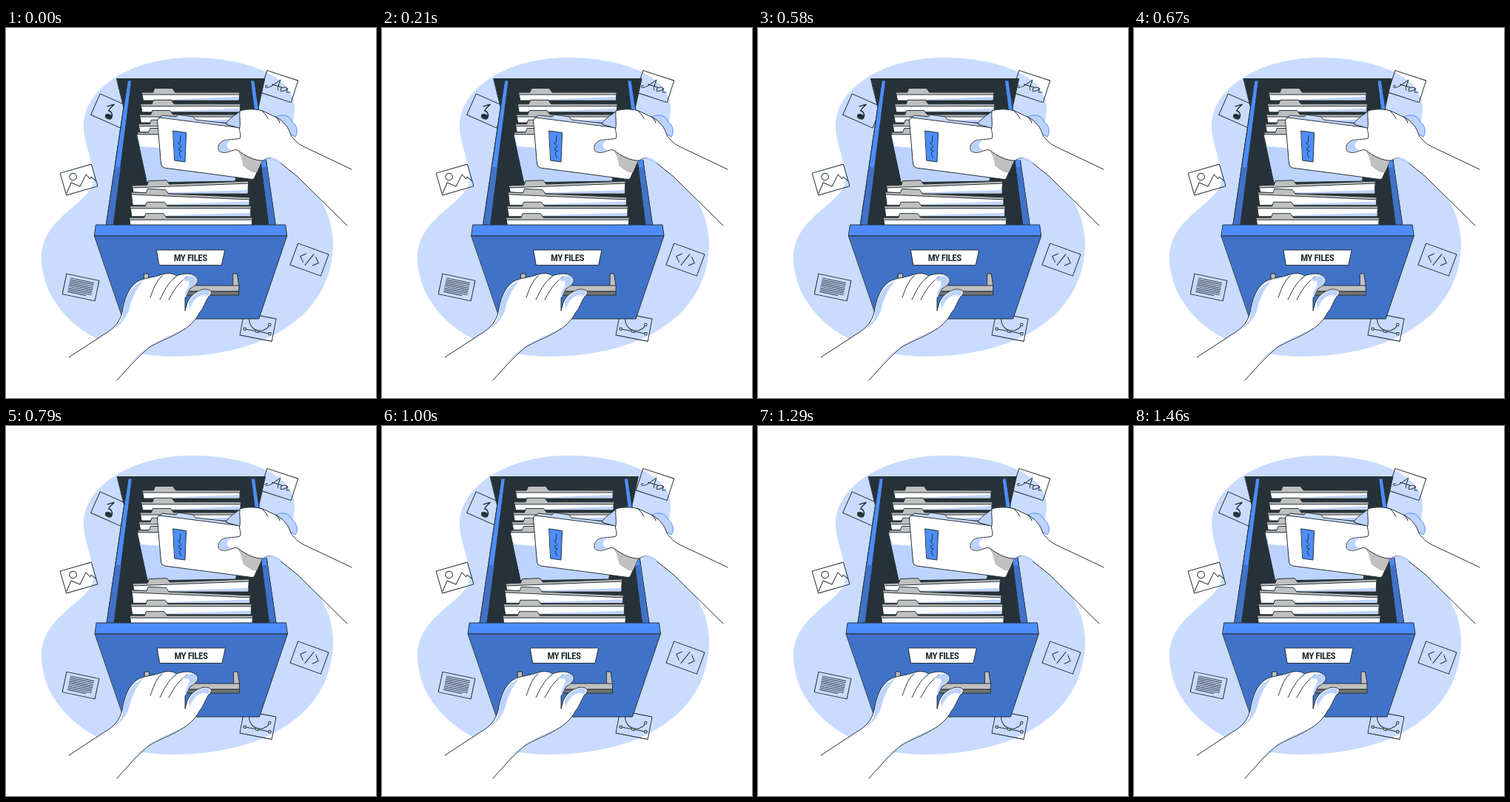
These frames come from a looping animation (500x500 px, 1500 ms). An HTML page:

```html
<!DOCTYPE html>
<html lang="en">
<head>
<meta charset="utf-8">
<title>My files</title>
<style>
  html, body { margin: 0; height: 100%; overflow: hidden; background: #fff; }
  svg { display: block; width: 100vw; height: 100vh; fill: none; stroke: #263238; stroke-linejoin: round; stroke-linecap: round; }
  .pale { fill: #c9dcff; }
  .shade { fill: #bcd3ff; }
  .white { fill: #fff; }
  .bright { fill: #4d8dfb; }
  .deep { fill: #4072c8; }
  .dark { fill: #263238; }
  .grey { fill: #c0c0c0; }
  .under { fill: #757575; }
  .flat { stroke: none; }
  text { font: 700 13px "Roboto Condensed", "Open Sans Condensed", Roboto, sans-serif; font-stretch: condensed; letter-spacing: -.5px; text-anchor: middle; stroke: none; fill: #263238; }
</style>
</head>
<body>
<svg viewBox="0 0 500 500">
  <defs><rect id="card" x="-22" y="-15.500" width="44" height="31"/></defs>

  <path class="pale flat" d="M250 40C172 40 105 80 105 132C105 160 121 185 118 207C114 238 48 255 48 311C48 380 120 444 225 444C345 444 442 392 442 290C442 225 380 190 385 145C387 128 392 115 389 98C380 62 320 40 250 40Z"/>

  <g transform="translate(369 79) rotate(18)">
    <use href="#card"/>
    <path d="M-15 4C-19 4 -18 8 -14 6C-8 3 -4 -6 -1 -9C-1 -4 -2 2 0 5M-10 0H4M11 -1C7 -3 1 2 4 5C8 6 10 2 12 -1C11 3 11 6 16 3"/>
  </g>
  <g transform="translate(141 112) rotate(24)">
    <use href="#card"/>
    <ellipse class="dark" cx="1" cy="8" rx="4.500" ry="3"/>
    <path stroke-width="1.500" d="M-6 -4L1 -10C0 -6 -3 -2 -2 1C2 0 6 4 5 8"/>
  </g>
  <g transform="translate(98.500 205) rotate(-16)">
    <use href="#card"/>
    <circle cx="-6.500" cy="-6" r="4.800"/>
    <path d="M-21 13L-11 1L-1 9L11 -4L15 3L17 1L22 8"/>
  </g>
  <g transform="translate(410 313) rotate(20)">
    <use href="#card"/>
    <path d="M-7 -6L-13 0L-7 6M3 -9L-3 9M7 -6L13 0L7 6"/>
  </g>
  <g transform="translate(101 350.500) rotate(12)">
    <use href="#card" transform="scale(1.02 .9)"/>
    <path id="lines"/>
  </g>
  <g transform="translate(340.500 404) rotate(11)">
    <use href="#card"/>
    <path d="M-14 -9C-10 9 10 9 15 -6M-17 6H18"/>
    <path class="white" d="M-18.500 4.500h3v3h-3zM-1.500 4.500h3v3h-3zM16 4.500h3v3h-3z"/>
    <circle class="white" cx="15" cy="-6" r="1.600"/>
  </g>

  <g id="drawer">
    <path class="dark" d="M150 68.500H350L341 109L336 71H165L159 106Z"/>
    <path class="dark" d="M165 71H336L364.500 266H136Z"/>
    <path class="bright" d="M165 71H170L145 266H136ZM331 71H336L364.500 266H355.500Z"/>
    <path class="deep flat" d="M148 188H155L145 266H136.500ZM346 188H353L364 266H356Z"/>
    <g id="back-files"></g>
    <path class="shade" d="M177 144H322L310 207L191 209Z"/>
    <path class="white flat" d="M178 144.500H320V170L182 160Z"/>
    <g id="front-files"></g>
    <path class="bright" d="M122 266H378L380 281H120Z"/>
    <path class="deep" d="M120 281H380L342 393H158.500Z"/>
    <path class="white" d="M204 300H296L291.500 320.500H207.500Z"/>
    <text x="249.500" y="315">MY FILES</text>
    <path class="grey" d="M187 332H193V348H307V332H312.500L315 348V356H187Z"/>
    <path d="M307 348H315"/>
    <path class="under" d="M187 356H315V361H187Z"/>
  </g>

  <g id="folder">
    <path class="pale" d="M207 122L211 118L230 120L233 117L253 120L256 124L318 131V140Z"/>
    <path class="white" d="M208 121L318 135L349 172L336 202Q335 205 332 204.500L214 189Q210 188 209.500 184L204.500 125Q204.500 121 208 121Z"/>
    <path class="grey flat" d="M313 166C320 176 318 180 321 187C328 192 334 197 339 195L347 177L320 168Z"/>
    <path class="bright" d="M226 139L243.500 141.500L242 181L228 179Z"/>
    <path d="M236 146L235 155Q231 155 235 158Q239 161 234 162Q232 165 237 166L234 169L236 175"/>
  </g>

  <g id="right-hand">
    <path class="shade" d="M318 111C310 118 300 123 297 130L318 136Z"/>
    <path class="shade" stroke="#4d8dfb" d="M365 120C375 115 384 119 386 126C394 132 395 141 391 147L378 140Z"/>
    <path class="white" d="M467 191L408 163C396 158 390 152 385 145C382 134 374 125 366 121L349 113C340 109 325 109 316 112C315 118 317 128 316 134C314 139 319 144 316 149C306 152 294 149 290 155C285 160 286 167 292 168C300 170 307 163 313 165C322 172 336 180 348 179C355 173 362 176 369 181L393 200L461 267M345 111Q350 115 354 122M364 120Q369 123 370 128"/>
    <path class="shade flat" d="M304 152C294 150 287 156 288 163C289 168 297 169 305 165C297 163 296 156 304 152ZM350 178C358 172 368 177 376 185C366 181 360 178 350 178Z"/>
  </g>

  <g id="left-hand">
    <path class="white" d="M85 445L134 413C146 406 154 397 157 384C160 366 165 352 177 343C187 337 198 338 211 333C218 331 226 331 230 335C240 331 254 330 259 339C260 345 254 349 249 352L242 365L242 382L245 371C250 360 260 354 268 353C278 353 280 358 274 363C269 370 267 379 262 384C256 396 246 405 236 410C222 419 205 424 193 432C177 445 163 462 150 476"/>
    <path d="M211 335C202 342 199 354 195 364M230 336C218 344 214 356 208 367M245 336C232 345 226 356 220 367"/>
    <path class="shade flat" d="M238 341C248 333 257 333 258 340C258 346 252 348 248 352L243 364C239 356 250 350 247 342ZM247 371C251 362 260 355 269 354C277 354 277 359 273 362C262 358 253 366 248 380ZM186 341C176 352 170 364 166 382C160 396 152 404 140 410C152 402 158 394 158 384C161 366 166 350 186 341ZM236 409C222 418 205 423 193 431C180 441 170 452 163 460C176 442 190 428 236 409Z"/>
  </g>
</svg>
<script>
  const byId = id => document.getElementById(id);

  // A sheet with a grey tabbed top edge; rise is how far the right end sits below the left
  function fileShape(left, right, y, rise, height, tabAt) {
    const width = right - left, tab = left + tabAt;
    const edge = x => y + rise * ((x - left) / width - .5);
    const top = edge(left), end = edge(right), low = y + height;
    return `<path class="white" d="M${left} ${top}L${right} ${end}L${right - 1} ${low}H${left + 2}Z"/>
      <path class="shade flat" d="M${left + 30} ${low - 1}L${right - 1} ${low - 5}V${low - 1}Z"/>
      <path class="grey" d="M${left} ${top}L${tab - 2} ${edge(tab)}L${tab} ${edge(tab) - 5.5}L${tab + 24} ${edge(tab + 24) - 5.5}L${tab + 28} ${edge(tab + 28)}L${right} ${end}v3L${left} ${top + 3}Z"/>`;
  }

  const repeat = (count, make) => Array.from({ length: count }, (_, i) => make(i)).join("");

  byId("back-files").innerHTML = repeat(5, i =>
    fileShape(184 - 1.5 * i, 316 + i, 87 + 16.5 * i - .75 * i * i, 0, 11, 17));
  byId("front-files").innerHTML = repeat(4, i =>
    fileShape(171 - 1.3 * i, 328 + 1.7 * i, 210 + 15.4 * i, [-6, 7][i] || 0, 14, 22));
  byId("lines").setAttribute("d", repeat(9, i => `M-16 ${2.35 * i - 9.5}h${i < 8 ? 32 : 25}`));

  // Horizontal shake, one stop per tenth of the loop, drawn at 24 fps
  const shake = [0, -1, 2, -4, 4, -4, 4, -4, 2, -1, 0];

  function draw(now) {
    const step = Math.floor((now % 1500 + 4) * 24 / 1000) + 1;
    const pos = step % 36 / 3.6;
    const i = Math.floor(pos);
    const x = shake[i] + (shake[i + 1] - shake[i]) * (pos - i);
    byId("drawer").setAttribute("transform", `translate(${x} 0)`);
    requestAnimationFrame(draw);
  }
  requestAnimationFrame(draw);
</script>
</body>
</html>
```
